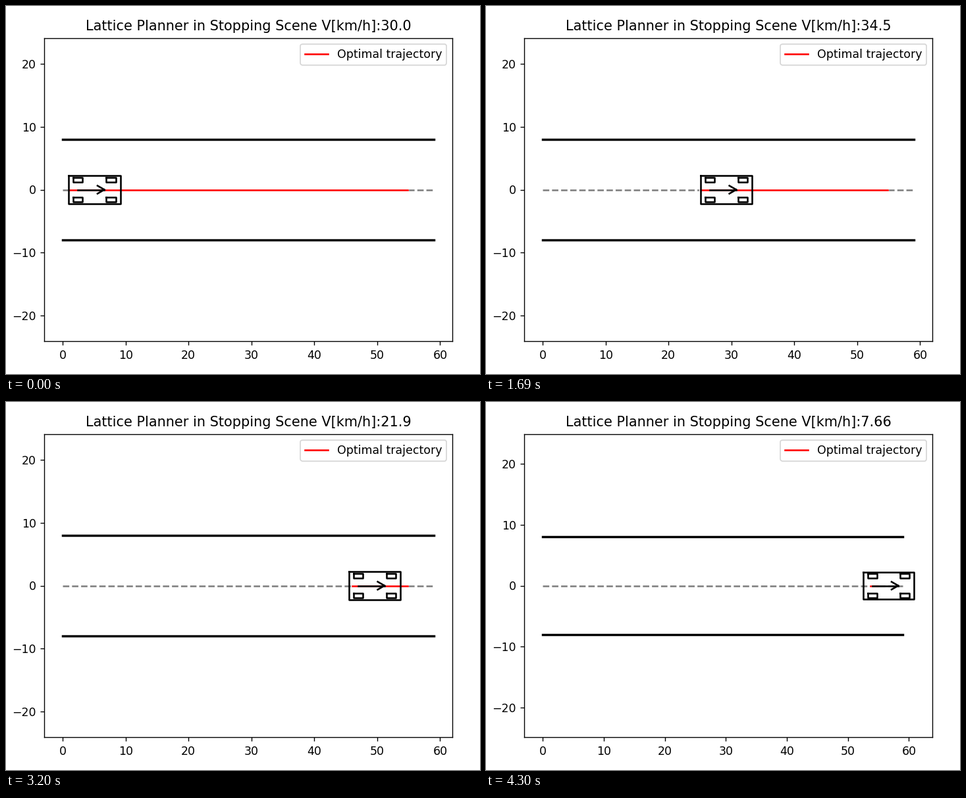
Recreate the animation shown at these times as a matplotlib script. Size 720 px wide and 560 px high, loop 6060 ms.

```python
import numpy as np
import matplotlib.pyplot as plt
from matplotlib.animation import FuncAnimation
from matplotlib.patheffects import withStroke

W, H, DPI = 720, 560, 125
LOOP, INTERVAL = 6060, 20
AX_X, AX_Y, AX_W, AX_H = 58, 50, 620, 461
ROAD_END, START, STOP = 59, 2.42, 54.85

# Vehicle dimensions in metres, measured from the rear axle
FRONT, REAR, WIDTH, TRACK, BASE = 6.75, 1.5, 4.5, 3.15, 5.25
WHEEL_R, WHEEL_W = 0.75, 0.75
ARROW = 0.8 * BASE

STEPS, DT = 46, 0.15
# Planner step reached at a time (ms); the rate is even between these points
CLOCK = {70: 1, 550: 7, 750: 8, 2100: 23, 3200: 35, 3680: 40, 3880: 41, 4020: 43, 4300: 46}
# Speed (km/h) at a planner step
SPEED = {0: 30.01, 7: 31.04, 14: 34.14, 17: 34.75, 23: 31.34, 35: 21.94, 43: 12.44, 46: 7.664}


def smooth(x, keys):
    """Cubic Hermite curve through the key points."""
    xs, ys = (np.array(list(v), float) for v in (keys.keys(), keys.values()))
    slopes = np.gradient(ys, xs)
    i = np.clip(np.searchsorted(xs, x, side="right") - 1, 0, len(xs) - 2)
    h = xs[i + 1] - xs[i]
    u = (x - xs[i]) / h
    return ((1 + 2 * u) * (1 - u) ** 2 * ys[i] + u * (1 - u) ** 2 * h * slopes[i]
            + u * u * (3 - 2 * u) * ys[i + 1] + u * u * (u - 1) * h * slopes[i + 1])


speed = smooth(np.arange(STEPS + 1), SPEED)
travel = (speed[1:] + speed[:-1]) / 2 / 3.6 * DT
position = START + np.concatenate([[0], np.cumsum(travel)])


def box(x0, x1, y0, y1):
    return np.array([x0, x0, x1, x1, x0]), np.array([y1, y0, y0, y1, y1])


def wheel(x, y):
    return box(x - WHEEL_R, x + WHEEL_R, y - WHEEL_W / 2, y + WHEEL_W / 2)


def barb(angle):
    d = 0.3 * ARROW
    return (np.array([ARROW, ARROW - d * np.cos(angle)]),
            np.array([0, d * np.sin(angle)]))


fig = plt.figure(figsize=(W / DPI, H / DPI), dpi=DPI)
ax = fig.add_axes([AX_X / W, AX_Y / H, AX_W / W, AX_H / H])
ax.tick_params(axis="x", pad=4)
title = ax.set_title("", pad=7)

ax.plot([0, ROAD_END], [0, 0], "--", color="gray")
for side in (8, -8):
    ax.plot([0, ROAD_END], [side, side], color="k", lw=2)
# The white stroke keeps the dashes from showing at the red line's edges
trajectory, = ax.plot([], [], color="r", label="Optimal trajectory",
                      path_effects=[withStroke(linewidth=2.5, foreground="w")])

shapes = [box(-REAR, FRONT, -WIDTH / 2, WIDTH / 2)]
shapes += [wheel(x, y) for x in (0, BASE) for y in (-TRACK / 2, TRACK / 2)]
shapes += [(np.array([0, ARROW]), np.zeros(2)), barb(np.pi / 6), barb(-np.pi / 6)]
car = [(ax.plot([], [], color="k")[0], shape) for shape in shapes]
ax.legend(loc="upper right")


def draw(frame):
    t = frame * INTERVAL + INTERVAL / 2
    k = int(np.interp(t, [0, *CLOCK], [0, *CLOCK.values()])) if t >= min(CLOCK) else 0
    s = position[k]
    previous = position[k - 1] if k else s - travel[0]

    for line, (xs, ys) in car:
        line.set_data(xs + s, ys)
    trajectory.set_data([previous, STOP], [0, 0])
    title.set_text(f"Lattice Planner in Stopping Scene V[km/h]:{str(float(speed[k]))[:4]}")

    # Equal axes with a 5 % margin; the car's nose may pass the road end
    right = max(ROAD_END, s + FRONT)
    half = 0.55 * right * AX_H / AX_W
    ax.set_xlim(-0.05 * right, 1.05 * right)
    ax.set_ylim(-half, half)
    return []


anim = FuncAnimation(fig, draw, frames=LOOP // INTERVAL, interval=INTERVAL,
                     repeat=True, repeat_delay=0, blit=False)
plt.show()
```
